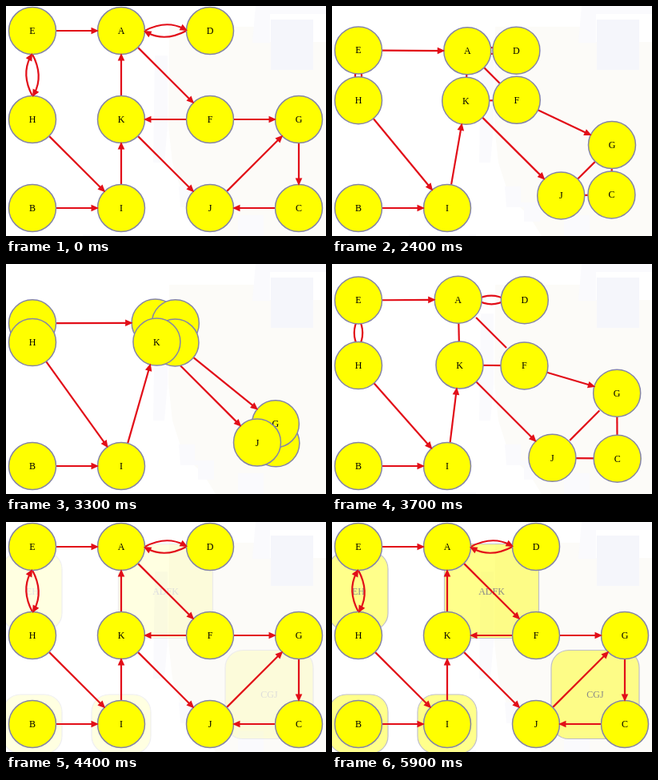
Recreate the animation shown at these times as an HTML page. Size 400 by 288 pixels, loop 6000 ms.

```html
<!DOCTYPE html>
<html lang="en">
<head>
<meta charset="utf-8">
<title>Strongly connected components</title>
<style>
html, body { margin: 0; width: 100%; height: 100%; overflow: hidden; background: #fff; }
svg { display: block; width: 400px; height: 288px; }
text { font: 12px "Liberation Serif", "Times New Roman", serif; text-anchor: middle; }
.node circle { fill: #ff0; stroke: #8585a6; stroke-width: 1.5; }
.line { fill: none; stroke: #e20e18; stroke-width: 2.2; }
.head { fill: #e20e18; }
.box { fill: #ff0; stroke: #77778c; stroke-width: 1.2; }
</style>
</head>
<body>
<svg viewBox="0 0 400 288">
  <g id="back">
    <path fill="#fcfbf8" d="M204 26H310V45H400V288H262L246 262L222 240L208 196L203 150Z"/>
    <path fill="#fafafd" d="M312 0H400V10H330V46H308ZM186 62H202V150L198 196H184ZM216 226H236V246H260V270H240V252H218ZM96 286H180V288H96ZM290 262H322V288H290Z"/>
    <rect x="331" y="17" width="53" height="63" fill="#f5f6fb"/>
  </g>
  <g id="boxes"></g>
  <g id="edges"></g>
  <g id="nodes"></g>
  <g id="heads"></g>
</svg>
<script>
const LOOP = 6000, R = 29.5, TIP = 28;
const IN = [1918, 2968], OUT = [3135, 3902], FADE = [3900, 5900];
const spots = {
  A: [144, 31], B: [33, 253], C: [366, 253], D: [255, 31], E: [33, 31], F: [255, 142],
  G: [366, 142], H: [33, 142], I: [144, 253], J: [255, 253], K: [144, 142]
};
const groups = [["ADFK", 59, 59], ["EH", 37, 49.5], ["CGJ", 55, 55.5], ["B", 37, 37], ["I", 37, 37]];
const links = "EA AD DA EH HE AF FK KA FG GC CJ JG KJ HI IK BI".split(" ");

const byId = id => document.getElementById(id);
const clamp = x => Math.min(1, Math.max(0, x));
const span = (t, [a, b]) => clamp((t - a) / (b - a));

function add(parent, tag, attrs = {}, text = "") {
  const el = document.createElementNS("http://www.w3.org/2000/svg", tag);
  for (const k in attrs) el.setAttribute(k, attrs[k]);
  el.textContent = text;
  return parent.appendChild(el);
}

const home = {};
for (const [name, w, h] of groups) {
  const mean = i => [...name].reduce((sum, n) => sum + spots[n][i], 0) / name.length;
  const group = { x: mean(0), y: mean(1) };
  for (const n of name) home[n] = group;
  add(byId("boxes"), "rect", { class: "box", x: group.x - w, y: group.y - h, width: 2 * w, height: 2 * h, rx: 22 });
  add(byId("boxes"), "text", { x: group.x, y: group.y + 4 }, name);
}

// each node starts slightly after the one before
const nodes = Object.keys(spots).map((name, i) => {
  const g = add(byId("nodes"), "g", { class: "node" });
  add(g, "circle", { r: R });
  add(g, "text", { y: 4 }, name);
  return { name, g, lag: i * 2.5 - 12 };
});

const edges = links.map(([from, to]) => ({
  from, to,
  inner: home[from] === home[to],
  paired: links.includes(to + from),
  line: add(byId("edges"), "path", { class: "line" }),
  head: add(byId("heads"), "path", { class: "head", d: "M0 0L-9.5 -4.3V4.3Z" })
}));

// 1 = spread out, 0 = gathered at the group's centre
function spread(t) {
  if (t < OUT[0]) return (1 + Math.cos(Math.PI * span(t, IN))) / 2;
  return span(t, OUT);
}

function drawEdge(e, pos, moving) {
  const [x1, y1] = pos[e.from], [x2, y2] = pos[e.to];
  const len = Math.hypot(x2 - x1, y2 - y1) || 1e-6;
  const ux = (x2 - x1) / len, uy = (y2 - y1) / len;
  // while a group moves, its inner edges end underneath the nodes
  const buried = e.inner && moving;
  const [cut1, cut2, stop] = buried ? [len * 0.27, len * 0.27, 0] : [R, TIP, 5];
  const ax = x1 + ux * cut1, ay = y1 + uy * cut1;
  const bx = x2 - ux * cut2, by = y2 - uy * cut2;
  const bend = e.paired ? len * 0.128 : 0;
  const cx = (ax + bx) / 2 + uy * bend, cy = (ay + by) / 2 - ux * bend;
  const turn = Math.atan2(by - cy, bx - cx);
  const ex = bx - Math.cos(turn) * stop, ey = by - Math.sin(turn) * stop;
  e.line.setAttribute("d", `M${ax} ${ay}Q${cx} ${cy} ${ex} ${ey}`);
  e.head.setAttribute("visibility", buried ? "hidden" : "visible");
  e.head.setAttribute("transform", `translate(${bx} ${by}) rotate(${turn * 180 / Math.PI})`);
}

function draw(t) {
  const pos = {};
  for (const { name, g, lag } of nodes) {
    const [x, y] = spots[name], c = home[name];
    const s = spread(t - lag);
    pos[name] = [c.x + (x - c.x) * s, c.y + (y - c.y) * s];
    g.setAttribute("transform", `translate(${pos[name]})`);
  }
  const moving = t >= IN[0] && t < OUT[1];
  for (const e of edges) drawEdge(e, pos, moving);
  byId("boxes").setAttribute("opacity", 0.45 * span(t, FADE));
}

const start = performance.now();
function tick() {
  draw((performance.now() - start) % LOOP);
  requestAnimationFrame(tick);
}
tick();
</script>
</body>
</html>
```
